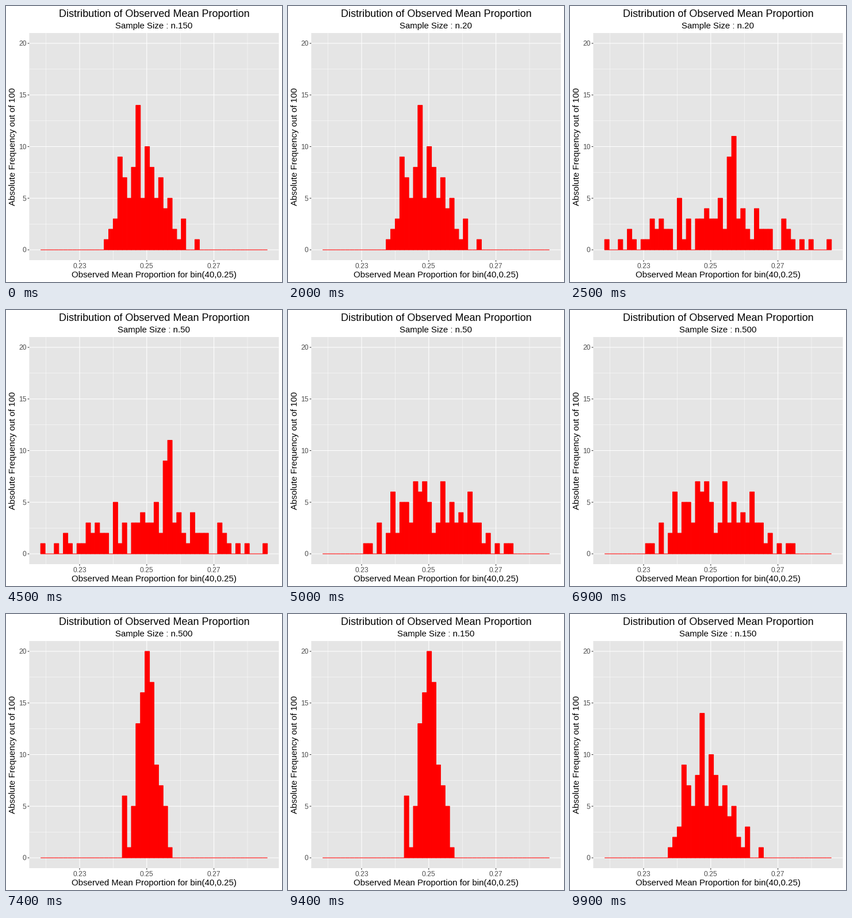
A matplotlib script for the animation above (10000 ms loop, 480 by 480 pixels).

```python
import matplotlib.pyplot as plt
from matplotlib.animation import FuncAnimation
from matplotlib.patches import Rectangle

SIZE, DPI = 480, 96
PT = 72 / DPI                      # points per pixel
STEP, LOOP = 100, 10000            # ms

LEFT, RIGHT, TOP, BOTTOM = 40.4, 474.5, 47, 442
Y0, Y_UNIT = 424.05, 17.955
X_MID, X_UNIT = 244.8, 5840
BIN0, BIN_W, BINS = 60.2, 7.89, 50
THIN, LINE = 0.53 * PT, 1.07 * PT

# sample size: (first filled bin, counts)
COUNTS = {
    20: (0, [1, 0, 0, 1, 0, 2, 1, 0, 1, 1, 3, 2, 3, 2, 2, 0, 5, 1, 3, 0,
             3, 3, 4, 3, 3, 5, 2, 9, 11, 3, 4, 2, 1, 4, 2, 2, 2, 0, 0, 3,
             2, 1, 0, 1, 0, 1, 0, 0, 0, 1]),
    50: (9, [1, 1, 0, 3, 0, 2, 6, 2, 5, 5, 3, 7, 6, 7, 5, 2, 3, 7, 3, 5,
             3, 4, 3, 6, 3, 3, 1, 2, 0, 1, 0, 1, 1]),
    150: (14, [1, 2, 3, 9, 7, 5, 8, 14, 5, 10, 8, 5, 7, 4, 5, 2, 1, 3,
               0, 0, 1]),
    500: (18, [6, 1, 5, 13, 16, 20, 17, 9, 7, 5, 1]),
}

# (start in ms, sample size); the heading switches ahead of the bars
HEADINGS = [(0, 150), (2000, 20), (4500, 50), (6900, 500), (9400, 150)]
BARS = [(0, 150), (2500, 20), (5000, 50), (7400, 500), (9900, 150)]

plt.rcParams["font.family"] = "Liberation Sans"
fig = plt.figure(figsize=(SIZE / DPI, SIZE / DPI), dpi=DPI, facecolor="white")
ax = fig.add_axes([0, 0, 1, 1])
ax.set(xlim=(0, SIZE), ylim=(SIZE, 0))
ax.axis("off")


def x_pos(value):
    return X_MID + (value - 0.25) * X_UNIT


def y_pos(value):
    return Y0 - value * Y_UNIT


def line(xs, ys, color, width):
    ax.plot(xs, ys, color=color, lw=width, solid_capstyle="butt",
            snap=False, zorder=2)


def label(x, y, text, size, color="black", ha="center", **kw):
    return ax.text(x, y, text, fontsize=size * PT, color=color, ha=ha,
                   va="baseline", **kw)


def draw_panel():
    ax.add_patch(Rectangle((LEFT, TOP), RIGHT - LEFT, BOTTOM - TOP,
                           fc="#E5E5E5", lw=0, snap=False, zorder=1))
    for v in (0.22, 0.24, 0.26, 0.28):
        line([x_pos(v)] * 2, [TOP, BOTTOM], "white", THIN)
    for v in (2.5, 7.5, 12.5, 17.5):
        line([LEFT, RIGHT], [y_pos(v)] * 2, "white", THIN)
    for v in (0.23, 0.25, 0.27):
        x = x_pos(v)
        line([x, x], [TOP, BOTTOM], "white", LINE)
        line([x, x], [BOTTOM, BOTTOM + 2.75], "#333333", LINE)
        label(x, 456, f"{v:.2f}", 12, "#4D4D4D")
    for v in (0, 5, 10, 15, 20):
        y = y_pos(v)
        line([LEFT, RIGHT], [y, y], "white", LINE)
        line([LEFT - 2.75, LEFT], [y, y], "#333333", LINE)
        label(35.6, y + 4.3, str(v), 12, "#4D4D4D", ha="right")


def draw_titles():
    label(257.5, 19, "Distribution of Observed Mean Proportion", 18)
    label(257.5, 472, "Observed Mean Proportion for bin(40,0.25)", 15)
    label(16.3, 244.7, "Absolute Frequency out of 100", 15, ha="right",
          rotation=90, rotation_mode="anchor").set_ha("center")


def current(schedule, t):
    return [size for start, size in schedule if start <= t][-1]


draw_panel()
draw_titles()
heading = label(257.5, 39, "", 15)
bars = [ax.add_patch(Rectangle((BIN0 + i * BIN_W, Y0), BIN_W, 0, fc="red",
                               ec="red", lw=LINE, snap=False, zorder=3))
        for i in range(BINS)]


def update(i):
    t = i * STEP
    heading.set_text(f"Sample Size : n.{current(HEADINGS, t)}")
    first, counts = COUNTS[current(BARS, t)]
    for k, bar in enumerate(bars):
        inside = first <= k < first + len(counts)
        bar.set_height(-Y_UNIT * counts[k - first] if inside else 0)
    return [heading, *bars]


anim = FuncAnimation(fig, update, frames=LOOP // STEP, interval=STEP,
                     repeat=True, repeat_delay=0, blit=False)
plt.show()
```
